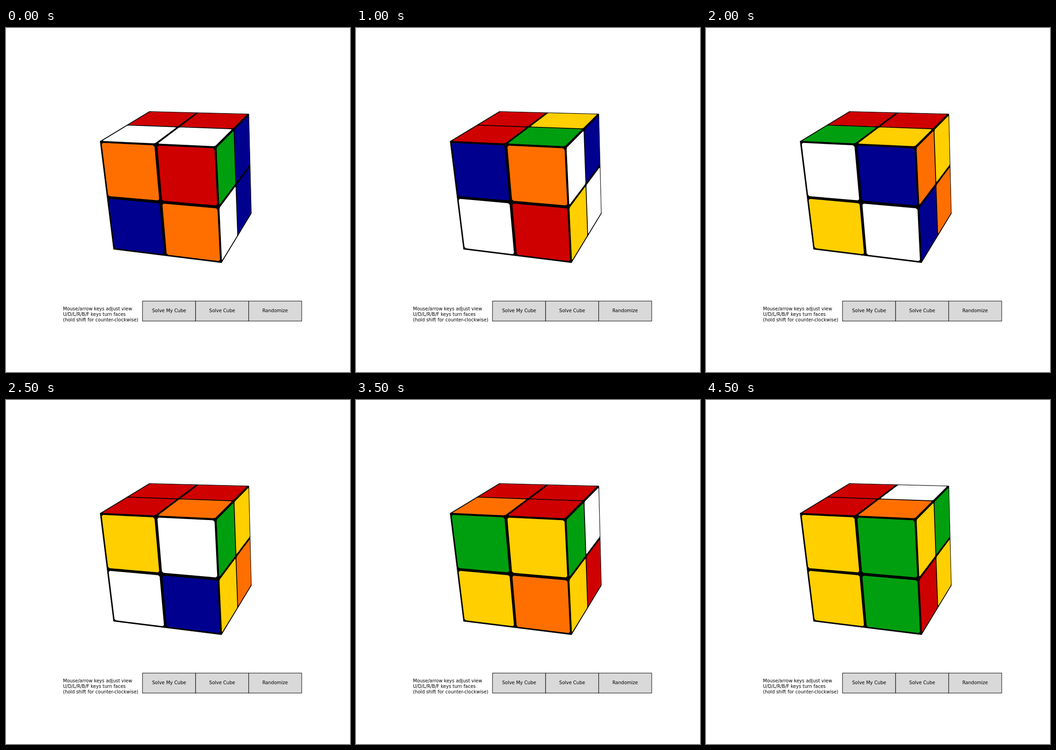
These frames come from a looping animation (748x748 px, 5000 ms). An HTML page:

```html
<!DOCTYPE html>
<html lang="en">
<head>
<meta charset="utf-8">
<title>2x2 cube</title>
<style>
  html, body { margin: 0; width: 100%; height: 100%; overflow: hidden; background: #fff; }
  svg { display: block; width: 748px; height: 748px; }
  text { font: 10px "DejaVu Sans", sans-serif; white-space: pre; }
  .button rect { fill: #d9d9d9; stroke: #000; }
  .button text { text-anchor: middle; }
</style>
</head>
<body>
<svg viewBox="0 0 748 748">
  <g id="cube"></g>
  <text x="124" y="614">Mouse/arrow keys adjust view</text>
  <text x="124" y="626">U/D/L/R/B/F keys turn faces</text>
  <text x="124" y="638">(hold shift for counter-clockwise)</text>
  <g class="button"><rect x="296.8" y="593.8" width="115.5" height="43.4"/><text x="354.7" y="618">Solve My Cube</text></g>
  <g class="button"><rect x="412.3" y="593.8" width="115.4" height="43.4"/><text x="470" y="618">Solve Cube</text></g>
  <g class="button"><rect x="527.7" y="593.8" width="115.3" height="43.4"/><text x="585.2" y="618">Randomize</text></g>
</svg>
<script>
const STEP = 500;
const COLORS = { W: '#ffffff', Y: '#ffcf00', B: '#00008f', G: '#009f0f', O: '#ff6f00', R: '#cf0000' };

// Visible stickers after each turn: up, front, right, each row by row.
const STATES = [
  'RRWW ORBO GBWB',
  'RYWY ORBW BBGW',
  'RYRG BOWR WBYW',
  'RYRG BOYW WBBO',
  'RRGY WBYW OYBO',
  'RRRO YWWB GYYO',
  'RRRO YWYO GYYR',
  'RROR GYYO GWYR',
  'RRRO YWYO GYYR',
  'RWRO YGYG YGRY',
].map(state => state.replace(/ /g, ''));

// Face coordinates (u right, v down, both -1..1) to cube coordinates.
const FACES = [
  (u, v) => [u, 1, v],
  (u, v) => [u, -v, 1],
  (u, v) => [1, -v, -u],
];

// Turn by 30 degrees about (1, -1, 0), then view from distance 10.
const cos = Math.cos(Math.PI / 6), sin = Math.sin(Math.PI / 6) * Math.SQRT1_2;
const near = (1 + cos) / 2, cross = (1 - cos) / 2;
const CENTER = { x: 383.3, y: 331.7 }, SCALE = 120.6, DISTANCE = 10;

function project([x, y, z]) {
  const px = near * x - cross * y - sin * z;
  const py = near * y - cross * x - sin * z;
  const pz = sin * (x + y) + cos * z;
  const zoom = SCALE * DISTANCE / (DISTANCE - pz);
  return [CENTER.x + px * zoom, CENTER.y - py * zoom];
}

const cube = document.getElementById('cube');

function addPolygon(points, attributes = {}) {
  const polygon = document.createElementNS('http://www.w3.org/2000/svg', 'polygon');
  polygon.setAttribute('points', points.map(p => project(p).map(n => n.toFixed(2))).join(' '));
  for (const name in attributes) polygon.setAttribute(name, attributes[name]);
  return cube.appendChild(polygon);
}

const SQUARE = [[-1, -1], [1, -1], [1, 1], [-1, 1]];
const a = 0.475, b = 0.45;
const STICKER = [[-b, -a], [b, -a], [a, -b], [a, b], [b, a], [-b, a], [-a, b], [-a, -b]];

for (const face of FACES) {
  addPolygon(SQUARE.map(([u, v]) => face(u, v)),
    { stroke: '#000', 'stroke-width': 0.8, 'stroke-linejoin': 'round' });
}
const stickers = FACES.flatMap(face =>
  [[-0.5, -0.5], [0.5, -0.5], [-0.5, 0.5], [0.5, 0.5]].map(([cu, cv]) =>
    addPolygon(STICKER.map(([u, v]) => face(cu + u, cv + v)))));

function draw(time) {
  const state = STATES[Math.floor(time / STEP) % STATES.length];
  stickers.forEach((sticker, i) => sticker.setAttribute('fill', COLORS[state[i]]));
}

function tick() {
  draw(performance.now());
  requestAnimationFrame(tick);
}
tick();
</script>
</body>
</html>
```
